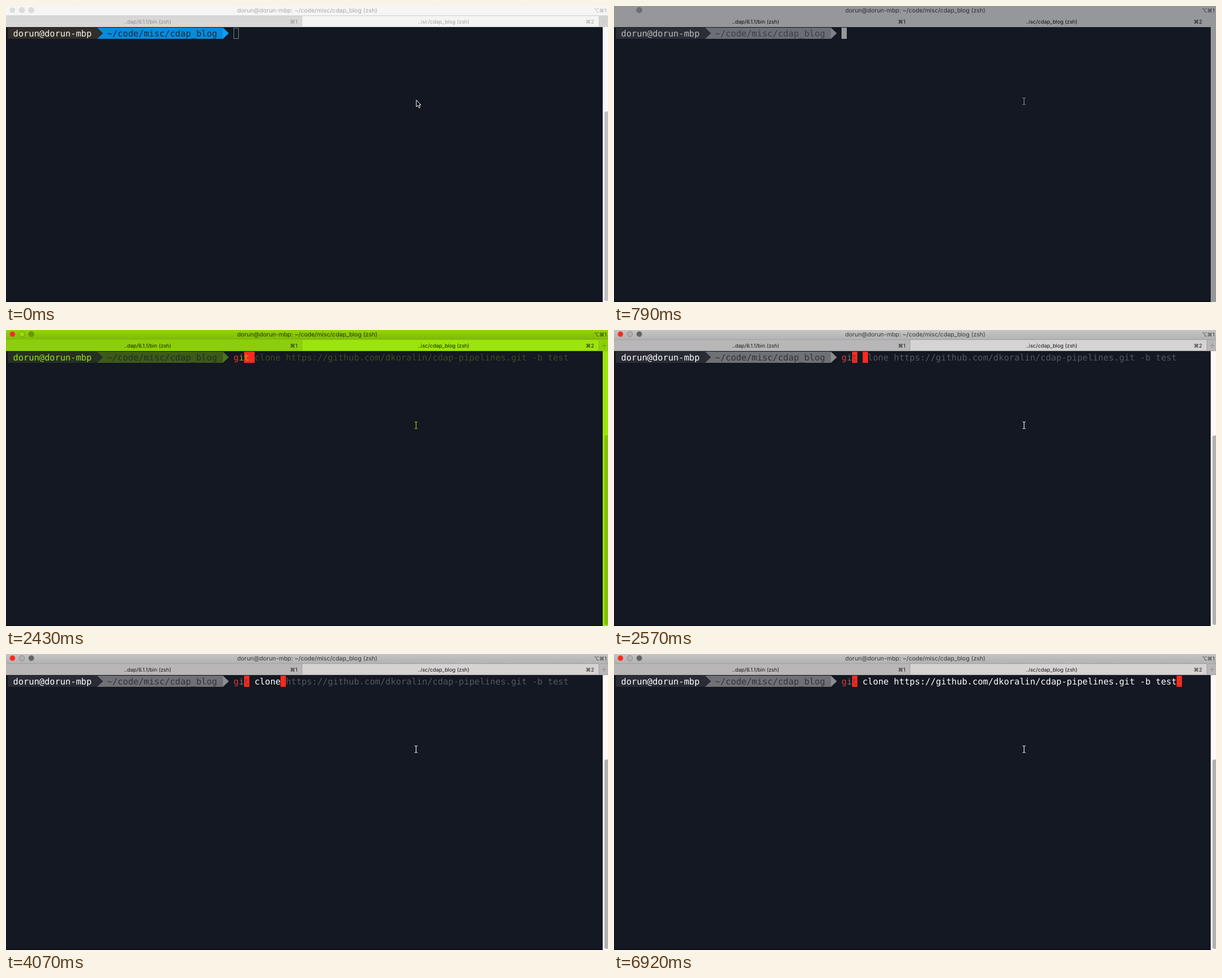
Recreate the animation shown at these times as an HTML page. Size 1024 px wide and 505 px high, loop 8 s.

```html
<!DOCTYPE html>
<html lang="en">
<head>
<meta charset="utf-8">
<title>Terminal</title>
<style>
  html, body { margin: 0; width: 100%; height: 100%; overflow: hidden; background: #121721; }
  svg { display: block; width: 1024px; height: 505px; text-rendering: geometricPrecision; }
  text { white-space: pre; }
  .mono { font: 14.8px "DejaVu Sans Mono", monospace; }
  .title { font: 10.15px Inter, sans-serif; }
  .tab { font: 8.9px Inter, "DejaVu Sans", sans-serif; }
</style>
</head>
<body>
<svg id="stage" viewBox="0 0 1024 505"></svg>
<script>
const LOOP = 8000, CELL = 8.91, CMD_X = 387;
const USER = 'dorun@dorun-mbp', PATH = '~/code/misc/cdap_blog';
const CMD = 'git clone https://github.com/dkoralin/cdap-pipelines.git -b test';
const RED = '#ff2a21', LIME = '#9ce40a';

// bar: title top and bottom; seg: prompt backgrounds and end arrow; git: colours of the first word
const idle = {
  bar: ['#f6f6f6', '#f5f5f5'], line: '#d2d2d2', title: '#a9a9a9', tabs: ['#d7d7d7', '#f4f4f4', '#d3d3d3'],
  label: ['#8c8c8c', '#a0a0a0'], dots: ['#dcdcdc', '#dcdcdc', '#dcdcdc'], rim: '#cfcfcf',
  strip: '#f8f8f8', thumb: '#c1c1c1', seg: ['#302d2b', '#078bdc', '#0c9ffa'],
  user: '#f6f3e4', path: '#14293c', ink: '#fff', beam: '#fff', cursor: '#f0f0f0'
};
const gray = {
  bar: ['#96979b', '#96979b'], line: '#96979b', title: '#2b2d33', tabs: ['#96979b', '#96979b', '#96979b'],
  label: ['#0c0e13', '#0c0e13'], dots: ['none', 'none', '#6e7075'], rim: '#55575c',
  strip: '#96979b', thumb: 'none', seg: ['#2b2e35', '#6b6e75', '#7f8187'],
  user: '#b9babd', path: '#3a3e46', ink: '#b9babd', beam: '#96979b', cursor: '#96979b'
};
const dim = {
  bar: ['#505050', '#505050'], line: '#505050', title: '#303234', tabs: ['#505050', '#93d30b', '#505050'],
  label: ['#1b1d20', '#16200a'], dots: [RED, LIME, '#6c9412'], rim: 'none',
  strip: LIME, thumb: '#585a52', seg: ['#22262f', '#4b4c4f', '#565759'],
  user: LIME, path: '#23272e', ink: LIME, ghost: '#505257', beam: '#a6a8ac', cursor: RED,
  git: [LIME, LIME, LIME]
};
const green = {
  bar: ['#92d50a', '#7db70c'], line: '#87c50b', title: '#26360f', tabs: ['#8dce0b', LIME, '#8dce0b'],
  label: ['#142006', '#142006'], dots: [RED, '#96dc0a', '#699411'], rim: '#5f860f',
  strip: LIME, thumb: '#83c00c', seg: ['#253023', '#3d5a19', '#4d7419'],
  user: LIME, path: '#22301f', ink: LIME, ghost: '#3b4b24', beam: LIME, cursor: RED,
  git: ['#f23a20', '#a8a018', '#91b512']
};
const active = {
  bar: ['#c6c5c5', '#b2b1b1'], line: '#a3a2a2', title: '#37383b', tabs: ['#b8b6b6', '#d6d3d3', '#b8b6b6'],
  label: ['#17181b', '#17181b'], dots: [RED, '#b2b0b0', '#626367'], rim: '#7d7d7e',
  strip: '#fff9f5', thumb: '#b2b1b1', seg: ['#292c35', '#707176', '#8c8d8f'],
  user: '#fff', path: '#30333a', ink: '#fff', ghost: '#55575e', beam: '#fff', cursor: RED,
  git: ['#d83b33', '#77787c', '#87302d']
};
const red = {
  bar: [RED, RED], line: RED, title: '#1c1116', tabs: [RED, RED, RED],
  label: ['#2b0f10', '#2b0f10'], dots: ['none', 'none', '#121721'], rim: 'none',
  strip: RED, thumb: 'none', seg: ['none', 'none', 'none'],
  user: RED, path: 'none', ink: RED, ghost: 'none', beam: '#6f7277', cursor: RED,
  git: [RED, RED, '#2b1018']
};

// start time, theme, typed characters
const STEPS = [
  [0, idle, 0], [500, idle, 0], [650, gray, 0], [790, gray, 0], [2140, dim, 1], [2280, green, 2],
  [2430, green, 3], [2570, active, 4], [3470, active, 5], [3620, active, 6], [3770, active, 7],
  [4070, active, 9], [5570, red, 10], [6920, active, CMD.length]
];

const rect = (x, y, w, h, fill, more = '') => `<rect x="${x}" y="${y}" width="${w}" height="${h}" fill="${fill}" ${more}/>`;
const text = (cls, x, y, fill, s, anchor = 'start') =>
  `<text class="${cls}" x="${x}" y="${y}" fill="${fill}" text-anchor="${anchor}">${s}</text>`;
const path = (d, fill, more = '') => `<path d="${d}" fill="${fill}" ${more}/>`;
const arrow = (x, fill) => path(`M${x} 37l10 9.5l-10 9.5z`, fill);
const cell = (i, fill) => rect(Math.floor(CMD_X + i * CELL + .4), 37, 9, 19, fill);
const span = (s, fill) => `<tspan fill="${fill}">${s}</tspan>`;

function chrome(c) {
  const light = c.dots.map((fill, i) =>
    `<circle cx="${11 + 16 * i}" cy="7" r="4.6" fill="${fill}" stroke="${i && fill !== 'none' ? c.rim : 'none'}" stroke-width=".7"/>`);
  return `<linearGradient id="bar" x2="0" y2="1"><stop stop-color="${c.bar[0]}"/><stop offset="1" stop-color="${c.bar[1]}"/></linearGradient>`
    + rect(0, 0, 1024, 17, 'url(#bar)') + light.join('')
    + rect(0, 16, 1024, 20, c.line)
    + rect(0, 17, 503, 18, c.tabs[0]) + rect(504, 17, 504, 18, c.tabs[1]) + rect(1009, 17, 15, 18, c.tabs[2])
    + text('title', 512.5, 11, c.title, `${USER}: ${PATH} (zsh)`, 'middle')
    + text('tab', 1000, 10.5, c.title, '⌥⌘1')
    + text('tab', 241, 29.5, c.label[0], '..dap/6.1.1/bin (zsh)', 'middle')
    + text('tab', 483, 29.5, c.label[0], '⌘1')
    + text('tab', 744.5, 29.5, c.label[1], '..isc/cdap_blog (zsh)', 'middle')
    + text('tab', 986, 29.5, c.label[1], '⌘2')
    + (c.thumb === 'none' ? '' : path('M1013.5 26.5h8m-4-4v8', 'none', `stroke="${c.title}" stroke-width=".8" opacity=".35"`))
    + rect(1015, 36, 9, 469, c.strip) + rect(1018, 180, 8, 323, c.thumb, 'rx="3"');
}

function prompt(c) {
  return rect(155, 37, 214, 19, c.seg[1]) + rect(3, 37, 152, 19, c.seg[0])
    + arrow(155, c.seg[0]) + arrow(369, c.seg[2])
    + text('mono', 12, 52, c.user, USER) + text('mono', 172, 52, c.path, PATH);
}

function command(c, typed) {
  const word = [...CMD.slice(0, Math.min(typed, 3))].map((ch, i) => span(ch, c.git[i])).join('');
  const skip = Math.min(typed + 1, CMD.length);
  const rest = span(CMD.slice(3, typed), c.ink);
  const ghost = text('mono', CMD_X + skip * CELL, 52, c.ghost, CMD.slice(skip));
  return (typed > 2 ? cell(2, RED) : '') + cell(typed, c.cursor)
    + (typed ? text('mono', CMD_X, 52, c.ink, word + rest) + ghost : '');
}

function pointer(c, start) {
  if (!start) return path('M698 160.5v11.5l2.6-2.4l1.9 4.2l1.9-.9l-1.8-4h3.2z', '#080a0e', 'stroke="#fff" stroke-width="1"');
  return path('M695 156.5q2.5 0 2.5 2q0-2 2.5-2M697.5 158v9M695 168.5q2.5 0 2.5-2q0 2 2.5 2', 'none', `stroke="${c.beam}"`)
    + (c === red ? path('M695 156.5q2.5 0 2.5 2', 'none', `stroke="${RED}"`) : '');
}

function draw([start, c, typed]) {
  const hollow = rect(387.5, 38, 8, 17.5, 'none', 'stroke="#777b83"');
  return rect(0, 0, 1024, 505, start ? '#131822' : '#121721') + rect(0, 504, 1024, 1, '#07090d')
    + chrome(c) + prompt(c) + (start ? command(c, typed) : hollow) + pointer(c, start);
}

const stage = document.getElementById('stage');
let shown;
function tick() {
  const t = performance.now() % LOOP;
  const step = STEPS.findLast(s => s[0] <= t);
  if (step !== shown) stage.innerHTML = draw(shown = step);
  requestAnimationFrame(tick);
}
tick();
</script>
</body>
</html>
```
